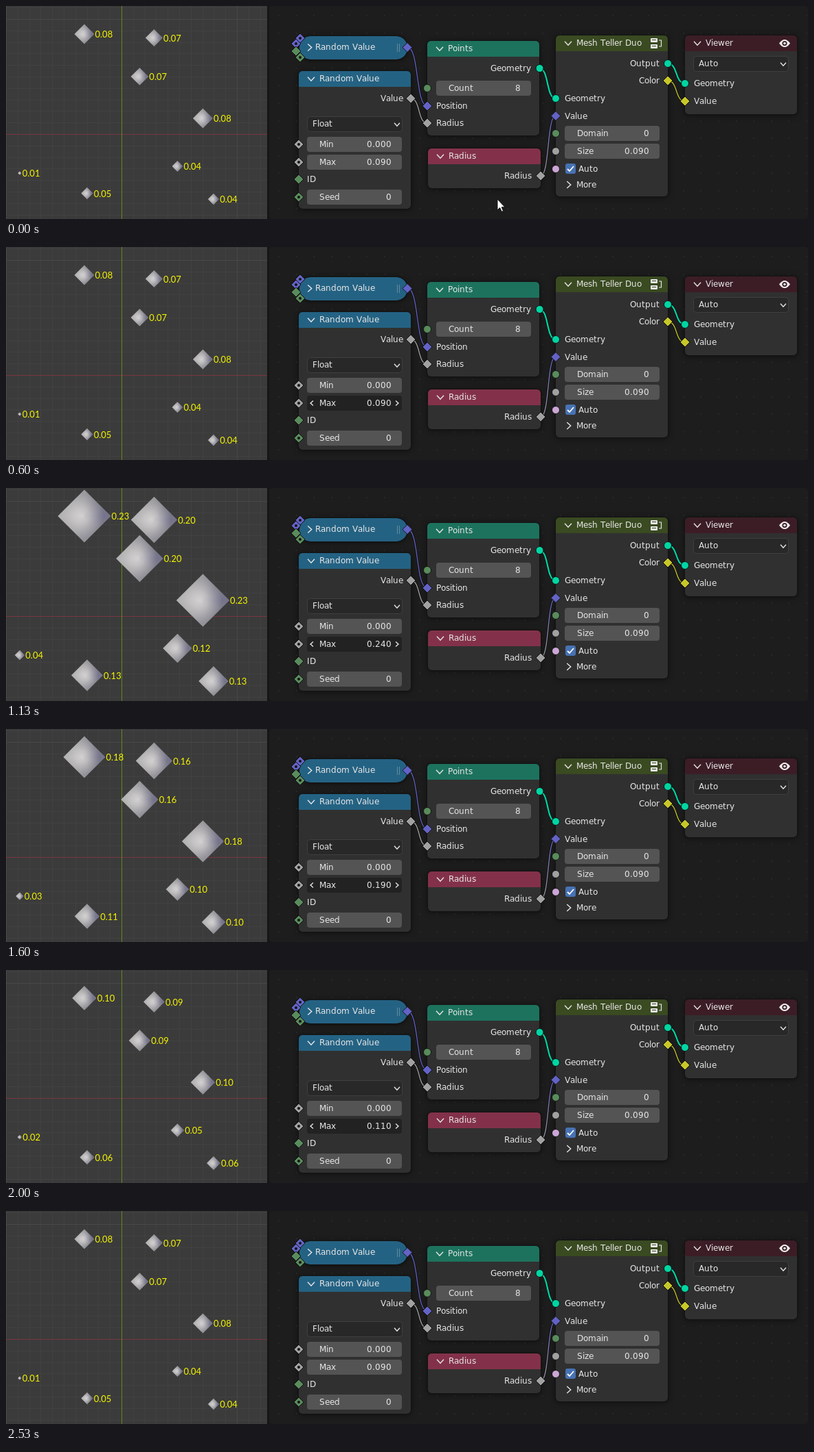
These frames come from a looping animation (1167x311 px, 3390 ms). An HTML page with a canvas:

```html
<!DOCTYPE html>
<html lang="en">
<head>
<meta charset="utf-8">
<title>Node editor: radius of points</title>
<style>
html, body { margin: 0; width: 100%; height: 100%; overflow: hidden; background: #1d1d1d; }
canvas { display: block; }
</style>
</head>
<body>
<canvas id="stage" width="1167" height="311"></canvas>
<script>
const ctx = document.getElementById('stage').getContext('2d');
const LOOP = 3390, TICK = 200 / 3;
const UI = '12px "DejaVu Sans", sans-serif';
const LABEL = '13px Lato, "Open Sans", sans-serif';
const C = {
  text: '#e6e6e6', body: '#303030', field: '#545454', hover: '#646464', active: '#222222',
  grey: '#a1a1a1', green: '#598c5c', purple: '#6363c7', teal: '#00d6a3',
  yellow: '#c7c729', pink: '#cca6d6', blue: '#246283'
};

// x, y and share of the maximum radius
const POINTS = [
  [114, 41, .975], [215.5, 46.5, .85], [194.5, 103, .866], [286.5, 164, .975],
  [249.5, 234, .535], [20, 244, .185], [118, 273.5, .581], [302, 282, .548]
];
const RISE = [11, 14, 17, 19, 22, 24];
const FALL = [23, 21, 19, 17, 15, 14, 13, 12, 11, 10, 9];

// ---- helpers ----
function box(x1, y1, x2, y2, r, fill, stroke) {
  ctx.beginPath();
  ctx.roundRect(x1, y1, x2 - x1, y2 - y1, r);
  if (fill) { ctx.fillStyle = fill; ctx.fill(); }
  if (stroke) { ctx.strokeStyle = stroke; ctx.lineWidth = 1; ctx.stroke(); }
}

function line(points, color, width) {
  ctx.beginPath();
  points.forEach(([x, y]) => ctx.lineTo(x, y));
  ctx.strokeStyle = color;
  ctx.lineWidth = width;
  ctx.stroke();
}

// Interface text sits on whole pixels
function text(str, x, y, right) {
  ctx.font = UI;
  ctx.fillStyle = C.text;
  const steps = [...str].map(ch => Math.round(ctx.measureText(ch).width));
  if (right) x -= steps.reduce((a, b) => a + b, 0);
  [...str].forEach((ch, i) => { ctx.fillText(ch, x, y); x += steps[i]; });
}

function chevron(x, y, dir, size = 5) {
  const d = size * .55;
  const shape = {
    down: [[-size, -d], [0, d], [size, -d]],
    right: [[-d, -size], [d, 0], [-d, size]],
    left: [[d, -size], [-d, 0], [d, size]]
  }[dir];
  line(shape.map(([a, b]) => [x + a, y + b]), C.text, 1.4);
}

function diamondPath(x, y, r) {
  ctx.beginPath();
  ctx.moveTo(x, y - r);
  ctx.lineTo(x + r, y);
  ctx.lineTo(x, y + r);
  ctx.lineTo(x - r, y);
  ctx.closePath();
}

function dot(x, y, r, fill) {
  ctx.beginPath();
  ctx.arc(x, y, r, 0, 7);
  ctx.fillStyle = fill;
  ctx.fill();
}

function outline() {
  ctx.strokeStyle = '#141414';
  ctx.lineWidth = 1;
  ctx.stroke();
}

function socket(x, y, color) {
  dot(x, y, 5.5, color);
  outline();
}

function gem(x, y, color, dotted) {
  diamondPath(x, y, 7);
  ctx.fillStyle = color;
  ctx.fill();
  outline();
  if (dotted) dot(x, y, 2, '#141414');
}

function link(x1, y1, x2, y2, from, to = from, width = 1.3) {
  const h = (x2 - x1) * .6;
  const g = ctx.createLinearGradient(x1, y1, x2, y2);
  g.addColorStop(0, from);
  g.addColorStop(1, to);
  ctx.beginPath();
  ctx.moveTo(x1, y1);
  ctx.bezierCurveTo(x1 + h, y1, x2 - h, y2, x2, y2);
  ctx.strokeStyle = '#101010';
  ctx.lineWidth = width + 1.6;
  ctx.stroke();
  ctx.strokeStyle = g;
  ctx.lineWidth = width;
  ctx.stroke();
}

function shadowed(draw) {
  ctx.save();
  ctx.shadowColor = 'rgba(0,0,0,.6)';
  ctx.shadowBlur = 9;
  ctx.shadowOffsetY = 1;
  draw();
  ctx.restore();
}

function node(x1, y1, x2, y2, color, title) {
  shadowed(() => box(x1, y1, x2, y2, 5, C.body));
  box(x1, y1, x2, y1 + 23, [5, 5, 0, 0], color);
  box(x1 - .5, y1 - .5, x2 + .5, y2 + .5, 5.5, null, '#131313');
  chevron(x1 + 18, y1 + 11.5, 'down');
  text(title, x1 + 30, y1 + 15);
}

function field(x, y, label, value, state = 'field') {
  box(x, y, x + 138, y + 22, 4, C[state]);
  text(label, x + 18, y + 15);
  text(value, x + 123, y + 15, true);
  if (state === 'active') {
    chevron(x + 7, y + 11, 'left', 3.5);
    chevron(x + 131, y + 11, 'right', 3.5);
  }
}

function dropdown(x, y, label) {
  box(x + .5, y + .5, x + 138.5, y + 22.5, 4, '#282828', '#3f3f3f');
  text(label, x + 8, y + 15);
  chevron(x + 131, y + 12, 'down', 4);
}

// ---- left view ----
function grid(color, gap) {
  ctx.fillStyle = color;
  for (let x = 168 % gap; x < 380; x += gap) ctx.fillRect(Math.round(x), 0, 1, 311);
  for (let y = 187 % gap; y < 311; y += gap) ctx.fillRect(0, Math.round(y), 380, 1);
}

function crystal(x, y, r) {
  const edge = ctx.createConicGradient(0, x, y);
  ['#74738a', '#86858f', '#94939a', '#a3a2a4', '#b2b1b1', '#aaa9aa', '#9b9a9e', '#807f8c', '#74738a']
    .forEach((c, i) => edge.addColorStop(i / 8, c));
  const glow = ctx.createRadialGradient(x - r * .12, y, 0, x - r * .12, y, r * .85);
  glow.addColorStop(0, 'rgba(212,210,210,.95)');
  glow.addColorStop(.35, 'rgba(206,204,204,.75)');
  glow.addColorStop(1, 'rgba(196,194,196,0)');
  diamondPath(x, y, r);
  ctx.fillStyle = edge;
  ctx.fill();
  ctx.fillStyle = glow;
  ctx.fill();
}

function view(max) {
  ctx.save();
  ctx.beginPath();
  ctx.rect(0, 0, 380, 311);
  ctx.clip();
  ctx.fillStyle = '#3b3b3b';
  ctx.fillRect(0, 0, 380, 311);
  grid('#414141', 16.8);
  grid('#484848', 168);
  ctx.fillStyle = '#7a3541';
  ctx.fillRect(0, 187, 380, 1);
  ctx.fillStyle = '#5f8a1c';
  ctx.fillRect(168, 0, 1, 311);
  for (const [x, y, share] of POINTS) crystal(x, y, max * share * 1.65);
  ctx.font = LABEL;
  ctx.fillStyle = '#f5f500';
  for (const [x, y, share] of POINTS) {
    const value = Math.floor(max * share) / 100;
    ctx.fillText(value.toFixed(2), x + max * share * 1.65 + 1, y + 5);
  }
  ctx.restore();
}

// ---- right editor ----
function backdrop() {
  ctx.fillStyle = '#161616';
  ctx.fillRect(380, 0, 787, 311);
  box(383, 0, 1167, 311, 4, '#1d1d1d');
  ctx.fillStyle = '#272727';
  for (let x = 396; x < 1167; x += 25.6)
    for (let y = 13; y < 311; y += 25.6) ctx.fillRect(Math.round(x), Math.round(y), 2, 2);
}

function links() {
  link(584, 60, 613, 146, C.purple);
  link(589, 135, 613, 171, C.grey);
  link(776, 91, 800, 135, C.teal, C.teal, 2.2);
  link(778, 248, 800, 160, C.grey, C.purple);
  link(963, 84, 988, 113, C.teal, C.teal, 2.2);
  link(963, 109, 988, 139, C.yellow);
}

function foldedNode() {
  shadowed(() => box(427, 44, 584, 78, 16, C.blue));
  box(426.5, 43.5, 584.5, 78.5, 16.5, null, '#131313');
  chevron(442, 60.5, 'right');
  text('Random Value', 450, 64);
  ctx.fillStyle = '#5f8ba3';
  ctx.fillRect(569, 55, 1, 12);
  ctx.fillRect(572, 55, 1, 12);
  gem(428, 47, C.purple, true);
  gem(422, 55, C.purple, true);
  gem(422, 66, C.green);
  gem(428, 75, C.green, true);
  gem(584, 60.5, C.purple);
}

function randomNode(max, state) {
  node(426, 95, 589, 296, C.blue, 'Random Value');
  text('Value', 578, 139, true);
  dropdown(438, 161, 'Float');
  field(438, 191, 'Min', '0.000');
  field(438, 217, 'Max', (max / 100).toFixed(3), state);
  text('ID', 438, 257);
  field(438, 268, 'Seed', '0');
  gem(589, 135, C.grey);
  gem(426, 202, C.grey, true);
  gem(426, 228, C.grey, true);
  gem(426, 253, C.green);
  gem(426, 279, C.green, true);
}

function pointsNode() {
  node(613, 51, 776, 189, '#1d725e', 'Points');
  text('Geometry', 764, 95, true);
  field(626, 109, 'Count', '8');
  text('Position', 626, 150);
  text('Radius', 626, 175);
  socket(776.5, 91, C.teal);
  socket(613, 120, C.green);
  gem(613, 146, C.purple);
  gem(613, 171, C.grey);
}

function radiusNode() {
  node(614, 208, 778, 266, '#83314a', 'Radius');
  text('Radius', 765, 252, true);
  gem(778, 248, C.grey);
}

function groupIcon(x, y) {
  box(x, y, x + 10, y + 6, 1, C.text);
  box(x, y + 9, x + 10, y + 15, 1, C.text);
  line([[x + 12, y + 3], [x + 15.5, y + 3], [x + 15.5, y + 12], [x + 12, y + 12]], C.text, 1.2);
  ctx.fillStyle = '#3a4a21';
  ctx.fillRect(x + 2, y + 2, 6, 1);
  ctx.fillRect(x + 2, y + 11, 6, 1);
}

function displayNode() {
  node(800, 43, 963, 278, '#3a4a21', 'Mesh Teller Duo');
  groupIcon(938, 47);
  text('Output', 951, 88, true);
  text('Color', 951, 113, true);
  text('Geometry', 813, 139);
  text('Value', 813, 165);
  field(813, 175, 'Domain', '0');
  field(813, 201, 'Size', '0.090');
  box(814, 230, 829, 245, 3, '#4772b3');
  line([[817, 238], [820, 241], [826, 234]], '#ffffff', 1.8);
  text('Auto', 833, 242);
  chevron(819, 261, 'right');
  text('More', 830, 265);
  socket(963, 84, C.teal);
  gem(963, 109, C.yellow);
  socket(800, 135, C.teal);
  gem(800, 160.5, C.purple);
  socket(800, 186, C.green);
  socket(800, 212, C.grey);
  socket(800, 238, C.pink);
}

function eyeIcon(x, y) {
  ctx.beginPath();
  ctx.moveTo(x - 8, y);
  ctx.quadraticCurveTo(x, y - 11, x + 8, y);
  ctx.quadraticCurveTo(x, y + 11, x - 8, y);
  ctx.fillStyle = '#f0f0f0';
  ctx.fill();
  dot(x, y, 3.6, '#3c1d26');
  dot(x, y, 1.8, '#f0f0f0');
}

function viewerNode() {
  node(988, 43, 1151, 158, '#3c1d26', 'Viewer');
  eyeIcon(1133, 54.5);
  dropdown(1000, 73, 'Auto');
  text('Geometry', 1001, 117);
  text('Value', 1001, 143);
  socket(988, 113, C.teal);
  gem(988, 139, C.yellow);
}

function arrow(x, y) {
  ctx.beginPath();
  [[0, 0], [0, 16], [3.7, 12.6], [6.2, 18.3], [8.6, 17.3], [6.2, 11.8], [11, 11.8]]
    .forEach(([a, b]) => ctx.lineTo(x + a, y + b));
  ctx.closePath();
  ctx.fillStyle = '#ffffff';
  ctx.fill();
  outline();
}

// ---- motion ----
function maxAt(tick) {
  if (tick < 12 || tick > 32) return 9;
  if (tick < 22) return RISE[Math.min(tick - 12, 5)];
  return FALL[tick - 22];
}

function pointerAt(tick) {
  if (tick < 8) {
    const p = tick / 7, e = p * p * (3 - 2 * p);
    return [715 - 205 * e, 282 - 47 * e];
  }
  if (tick >= 35 && tick < 38) return [510, 235 + 7 * (tick - 35)];
  return null;
}

function stateAt(tick, pointer) {
  if (tick >= 9 && tick < 35) return 'active';
  if (tick === 8) return 'hover';
  const over = pointer && pointer[0] > 438 && pointer[0] < 576 && pointer[1] > 217 && pointer[1] < 239;
  return over ? 'hover' : 'field';
}

function draw(time) {
  const tick = Math.floor((time % LOOP + 4) / TICK);
  const max = maxAt(tick), pointer = pointerAt(tick);
  view(max);
  backdrop();
  links();
  foldedNode();
  randomNode(max, stateAt(tick, pointer));
  pointsNode();
  radiusNode();
  displayNode();
  viewerNode();
  if (pointer) arrow(...pointer);
}

const start = performance.now();
function play() {
  draw(performance.now() - start);
  requestAnimationFrame(play);
}
play();
</script>
</body>
</html>
```
